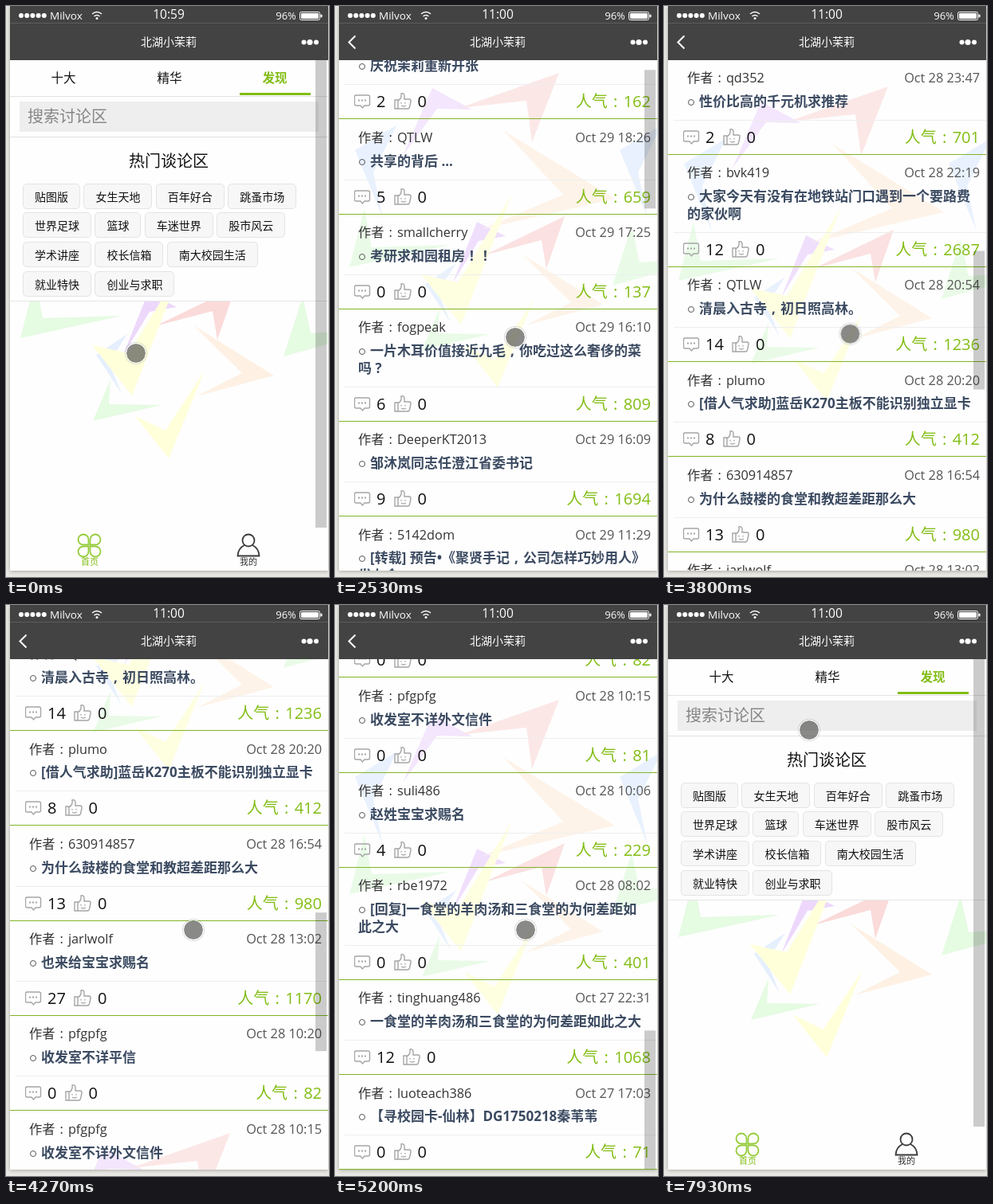
These frames come from a looping animation (405 px wide and 717 px high, 8 s). An HTML page:

```html
<!DOCTYPE html>
<html lang="zh-CN">
<head>
<meta charset="utf-8">
<title>论坛</title>
<style>
@property --s { syntax: "<number>"; inherits: true; initial-value: 0; }
html, body { margin: 0; width: 100%; height: 100%; overflow: hidden; background: #e9e8e4; }
body { position: relative; font-family: "Open Sans", "Noto Sans CJK SC", "Noto Sans CJK", sans-serif; color: #111; }
div, svg { position: absolute; box-sizing: border-box; white-space: nowrap; }
.case { left: 5px; top: 0; width: 399px; height: 709px; background: #fefefe; box-shadow: 0 1px 5px #aaa9a4; }
#phone { left: 0; top: 0; width: 405px; height: 717px; clip-path: inset(0 1px 8px 5px); }
.mid { transform: translate(-50%, -50%); line-height: 1; }
.loop { animation: 8s linear infinite; }
.flag { animation: 8s step-end infinite; }

/* header */
#head { left: 0; top: 0; width: 405px; height: 68px; background: #434343; color: #fff; }
#head svg { left: 0; top: 0; }
.rule { left: 0; top: 21px; width: 405px; height: 1px; background: #5c5c5c; }
.brand { left: 55px; top: 5px; font-size: 13.5px; line-height: 14px; }
.clock { left: 204px; top: 11px; font-size: 15.5px; }
.before { animation-name: before; }
.after { animation-name: after; }
.inner { animation-name: inner; }
@keyframes before { 0% { opacity: 1 } 22.5%, 100% { opacity: 0 } }
@keyframes after { 0% { opacity: 0 } 22.5%, 100% { opacity: 1 } }
@keyframes inner { 0% { opacity: 0 } 18.4% { opacity: 1 } 88.3%, 100% { opacity: 0 } }

/* first page */
#home { left: 0; top: 68px; width: 405px; height: 641px; background: #fefefe; }
.wm { left: 0; width: 405px; height: 851px; }
#doc .wm { opacity: .8; }
.panel { left: 0; top: 0; width: 405px; height: 303px; background: #fefefe; border-bottom: 1px solid #e6e6e6; }
.line { left: 0; width: 405px; height: 1px; background: #e2e2e2; }
.tab { top: 23px; font-size: 15.5px; }
.on { color: #82bd14; font-weight: 700; }
.under { left: 293px; top: 41px; width: 89px; height: 3px; background: #82bd14; }
.search { left: 17px; top: 52px; width: 375px; height: 38px; background: #eee; color: #858585; font-size: 20px; line-height: 38px; padding-left: 10px; }
.row { left: 21px; display: flex; gap: 4.4px; }
.row span { height: 32px; box-sizing: border-box; padding: 0 14px; border: 1px solid #e4e4e4; border-radius: 5px; background: #f7f7f7; font-size: 14px; line-height: 31px; }
.row .press { animation-name: press; }
@keyframes press { 0%, 23.5% { background: #f7f7f7; border-color: #e4e4e4; color: #111 } 13.4% { background: #dcdcdc; border-color: #bbb; color: #666 } 100% { background: #f7f7f7 } }
.bar { left: 388px; width: 14px; background: rgba(0, 0, 0, .2); }
#tabs { left: 0; top: 655px; width: 405px; height: 54px; background: #fefefe; font-size: 11px; animation-name: tabs; }
@keyframes tabs { 0% { opacity: 1 } 18.4% { opacity: 0 } 89.1%, 100% { opacity: 1 } }

/* topic list */
#list { left: 0; top: 68px; width: 405px; height: 641px; overflow: hidden; background: #fefefe; animation-name: slide, scroll; }
@keyframes slide {
  0%, 19.6% { transform: translateX(405px); animation-timing-function: ease-out }
  23.3%, 88.3% { transform: none }
  88.31%, 100% { transform: translateX(405px) }
}
@keyframes scroll {
  0%, 30.9% { --s: 0 }
  31.625%, 32.4% { --s: 45 }
  34.125%, 35.8% { --s: 215 }
  39.125%, 40% { --s: 430 }
  41.625%, 42.4% { --s: 536 }
  50.875% { --s: 1105 }
  53.375%, 55% { --s: 1168 }
  65%, 100% { --s: 1712 }
}
#doc { left: 0; top: 0; width: 405px; transform: translateY(calc(round(var(--s), 1) * -1px)); }
#items { left: 0; top: 0; width: 405px; animation-name: items; }
@keyframes items { 0% { opacity: 0 } 24.1%, 100% { opacity: 1 } }
.thumb { top: 0; height: 174px; transform: translateY(calc(var(--s) * .2724px)); animation-name: fade; }
@keyframes fade { 0%, 68% { opacity: 1 } 72%, 100% { opacity: 0 } }
.item { position: relative; height: 119.3px; border-bottom: 1px solid #82b527; }
.item.two { height: 141px; }
.by, .date { top: 12.5px; font-size: 16.3px; line-height: 20px; color: #333; }
.by { left: 29px; }
.date { right: 9px; color: #555; }
.name { left: 29px; top: 41.3px; font-size: 17px; line-height: 21.7px; font-weight: 700; color: #3b4a61; white-space: pre; }
.name i { display: inline-block; width: 8px; height: 8px; box-sizing: border-box; margin: 0 6px 1px 1px; border: 1px solid #555; border-radius: 50%; }
.wide { display: inline-block; width: 1em; text-align: center; }
.foot { left: 12px; right: 0; bottom: 0; height: 43px; border-top: 1px solid #eee; padding-left: 12px; display: flex; align-items: center; font-size: 20px; line-height: 42px; }
.foot svg { position: static; width: 22px; height: 24px; fill: none; stroke: #a5a5a5; stroke-width: 1.4; }
.foot svg:first-child { margin-right: 6px; }
.foot svg:nth-of-type(2) { margin: 0 7.5px 0 10.5px; }
.pop { right: 9px; color: #82bd14; }

/* pointer */
#dot { left: -13px; top: -13px; width: 26px; height: 26px; border-radius: 50%; border: 1.5px solid #fff; background: rgba(88, 88, 84, .7); background-clip: padding-box; box-shadow: 0 0 0 1px rgba(130, 130, 130, .3); animation-name: click; }
#pointer { left: 0; top: 0; animation-name: move; }
@keyframes click { 0% { background-color: rgba(88, 88, 84, .7) } 13.4% { background-color: rgba(50, 50, 50, .72) } 23.5%, 100% { background-color: rgba(88, 88, 84, .7) } }
@keyframes move {
  0%, 3.5% { transform: translate(163px, 436px) }
  10.875%, 13.2% { transform: translate(65px, 249px) }
  14.1%, 23.6% { transform: translate(68px, 243px) }
  31.2%, 32.4% { transform: translate(226px, 416px) }
  41.625%, 42.4% { transform: translate(232px, 415px) }
  53.375%, 55% { transform: translate(235px, 408px) }
  65%, 66% { transform: translate(239px, 408px) }
  76.6% { transform: translate(45px, 66px) }
  77.5% { transform: translate(32px, 63px) }
  78.4%, 82.6% { transform: translate(24px, 63px) }
  85%, 91.8% { transform: translate(23px, 59px) }
  96.2% { transform: translate(125px, 184px) }
  99.1%, 100% { transform: translate(182px, 157px) }
}
</style>
</head>
<body>
<svg width="0" height="0">
  <symbol id="stars" viewBox="0 112 405 851">
    <g fill="#f1e1fd">
      <path d="M122 192L172 219L128 218L85 277Z"/>
      <path fill="#edd8fc" d="M178 360L214 378L180 384L147 438Z"/>
    </g>
    <g fill="#fce2e2">
      <path d="M281 173L156 217L240 208L247 260Z"/>
      <path fill="#fbdada" d="M288 353L187 402L259 383L265 419Z"/>
    </g>
    <path fill="#fef1e4" d="M211 245L351 331L185 369L286 326ZM235 401L336 464L239 490L296 461Z"/>
    <path fill="#e5effe" d="M25 270L78 238L48 298L60 355ZM357 270L410 238L380 298L392 355ZM113 438L152 412L129 448L145 487Z"/>
    <path fill="#e5fbe2" d="M37 343L18 417L145 389L46 392ZM372 365L348 440L475 405L382 411ZM131 469L109 521L195 501L129 500Z"/>
    <path fill="#ffffda" d="M222 325L158 489L108 426L154 436ZM249 458L204 568L162 515L200 533Z"/>
  </symbol>
  <symbol id="talk" viewBox="0 0 22 24">
    <path d="M2.500 4h15q2 0 2 2v9q0 2-2 2H13l-2.500 3l-2.500-3H2.500q-2 0-2-2V6q0-2 2-2Z"/>
    <path d="M5 10.500h2m2 0h2m2 0h2" stroke-width="2"/>
  </symbol>
  <symbol id="like" viewBox="0 0 22 24">
    <path d="M1 10h4v11H1ZM5 11q5-3 4-9q4-1 4 3v4h6q2.500 0 2 3l-1.500 7q-.5 2-2.500 2H5M9 13v1.500m5-1.500v1.500M9 17q3 2 6 0"/>
  </symbol>
</svg>
<div class="case"></div>
<div id="phone">
  <div id="home">
    <svg class="wm" style="top:44px"><use href="#stars"/></svg>
    <div class="panel">
      <div class="tab mid" style="left:72px">十大</div>
      <div class="tab mid" style="left:205px">精华</div>
      <div class="tab mid on" style="left:337px">发现</div>
      <div class="under"></div>
      <div class="line" style="top:45px"></div>
      <div class="search">搜索讨论区</div>
      <div class="line" style="top:96px"></div>
      <div class="mid" style="left:204px;top:127px;font-size:20px">热门谈论区</div>
      <div id="tags"></div>
    </div>
    <div class="bar" style="top:0;height:587px"></div>
  </div>
  <div id="tabs" class="flag">
    <svg width="405" height="54" fill="none" stroke-width="1.800">
      <g stroke="#96cc3c">
        <path id="leaf" d="M103.500 21V15a6.500 6.500 0 1 0-6.500 6.500h6.500Z"/>
        <use href="#leaf" transform="matrix(-1 0 0 1 209 0)"/>
        <use href="#leaf" transform="matrix(1 0 0 -1 0 45)"/>
        <use href="#leaf" transform="matrix(-1 0 0 -1 209 45)"/>
      </g>
      <g stroke="#3a3a3a"><circle cx="304" cy="16" r="7.500"/><path d="M299 22q-8 4-8.500 13.500h27q-.5-9.500-8.500-13.500"/></g>
    </svg>
    <div class="mid" style="left:105px;top:42px;color:#82bd14">首页</div>
    <div class="mid" style="left:304px;top:42px;color:#333">我的</div>
  </div>
  <div id="list" class="loop">
    <div id="doc">
      <svg class="wm" style="top:0"><use href="#stars"/></svg>
      <svg class="wm" style="top:851px"><use href="#stars"/></svg>
      <svg class="wm" style="top:1702px"><use href="#stars"/></svg>
      <div id="items" class="flag"></div>
    </div>
    <div class="bar thumb loop"></div>
  </div>
  <div id="head">
    <div class="rule"></div>
    <svg width="405" height="68" fill="#fff">
      <path d="M19 12h29" stroke="#fff" stroke-width="6" stroke-linecap="round" stroke-dasharray="0 7.200"/>
      <g fill="none" stroke="#fff" stroke-width="1.500"><path d="M108 10q6-5 12 0M110.500 13q3.500-3 7 0"/><rect x="368.500" y="7.500" width="25" height="10" rx="2" stroke-width="1"/></g>
      <circle cx="114" cy="15.500" r="1.500"/>
      <rect x="370" y="9" width="22" height="7" rx="1"/><rect x="394.500" y="10.500" width="2" height="4" rx="1"/>
      <circle cx="373.500" cy="45.500" r="3"/><circle cx="381" cy="45.500" r="3.600"/><circle cx="389" cy="45.500" r="3"/>
      <path class="flag inner" d="M25.500 37.500L17.500 45.500L25.500 53.500" fill="none" stroke="#fff" stroke-width="2"/>
    </svg>
    <div class="brand">Milvox</div>
    <div class="clock mid flag before">10:59</div>
    <div class="clock mid flag after">11:00</div>
    <div class="mid" style="left:351px;top:12px;font-size:13px">96%</div>
    <div class="mid" style="left:204px;top:45px;font-size:14px">北湖小茉莉</div>
  </div>
  <div id="pointer" class="loop"><div id="dot" class="flag"></div></div>
</div>
<script>
const tags = ["贴图版 女生天地 百年好合 跳蚤市场", "世界足球 篮球 车迷世界 股市风云", "学术讲座 校长信箱 南大校园生活", "就业特快 创业与求职"];
document.getElementById("tags").innerHTML = tags.map((row, r) =>
  `<div class="row" style="top:${154.5 + r * 36.7}px">` +
  row.split(" ").map((tag, c) => `<span${r + c ? "" : ' class="press flag"'}>${tag}</span>`).join("") +
  "</div>").join("");

// author, date, title, replies, popularity
const topics = [
  ["pfgpfg", "Oct 29 19:08", "庆祝茉莉重新开张", 2, 162],
  ["QTLW", "Oct 29 18:26", "共享的背后 ...", 5, 659],
  ["smallcherry", "Oct 29 17:25", "考研求和园租房！！", 0, 137],
  ["fogpeak", "Oct 29 16:10", "一片木耳价值接近九毛，你吃过这么奢侈的菜\n吗？", 6, 809],
  ["DeeperKT2013", "Oct 29 16:09", "邹沐岚同志任澄江省委书记", 9, 1694],
  ["5142dom", "Oct 29 11:29", "[转载] 预告•《聚贤手记，公司怎样巧妙用人》\n发布会", 0, 116],
  ["mmr4921", "Oct 29 10:08", "穆云舟现在什么情况", 4, 1510],
  ["qd352", "Oct 28 23:47", "性价比高的千元机求推荐", 2, 701],
  ["bvk419", "Oct 28 22:19", "大家今天有没有在地铁站门口遇到一个要路费\n的家伙啊", 12, 2687],
  ["QTLW", "Oct 28 20:54", "清晨入古寺，初日照高林。", 14, 1236],
  ["plumo", "Oct 28 20:20", "[借人气求助]蓝岳K270主板不能识别独立显卡", 8, 412],
  ["630914857", "Oct 28 16:54", "为什么鼓楼的食堂和教超差距那么大", 13, 980],
  ["jarlwolf", "Oct 28 13:02", "也来给宝宝求赐名", 27, 1170],
  ["pfgpfg", "Oct 28 10:20", "收发室不详平信", 0, 82],
  ["pfgpfg", "Oct 28 10:15", "收发室不详外文信件", 0, 81],
  ["suli486", "Oct 28 10:06", "赵姓宝宝求赐名", 4, 229],
  ["rbe1972", "Oct 28 08:02", "[回复]一食堂的羊肉汤和三食堂的为何差距如\n此之大", 0, 401],
  ["tinghuang486", "Oct 27 22:31", "一食堂的羊肉汤和三食堂的为何差距如此之大", 12, 1068],
  ["luoteach386", "Oct 27 17:03", "【寻校园卡-仙林】DG1750218秦苇苇", 0, 71]
];
const icon = id => `<svg><use href="#${id}"/></svg>`;
// full-width punctuation, centred in its cell
const marks = { "：": ":", "，": ",", "！": "!", "？": "?" };
const centre = text => text.replace(/[：，！？]/g, m => `<span class="wide">${marks[m]}</span>`);
document.getElementById("items").innerHTML = topics.map(([by, date, name, replies, pop]) =>
  `<div class="item${name.includes("\n") ? " two" : ""}">
    <div class="by">${centre("作者：")}${by}</div><div class="date">${date}</div>
    <div class="name"><i></i>${centre(name)}</div>
    <div class="foot">${icon("talk")}${replies}${icon("like")}0<div class="pop">${centre("人气：")}${pop}</div></div>
  </div>`).join("");
</script>
</body>
</html>
```
